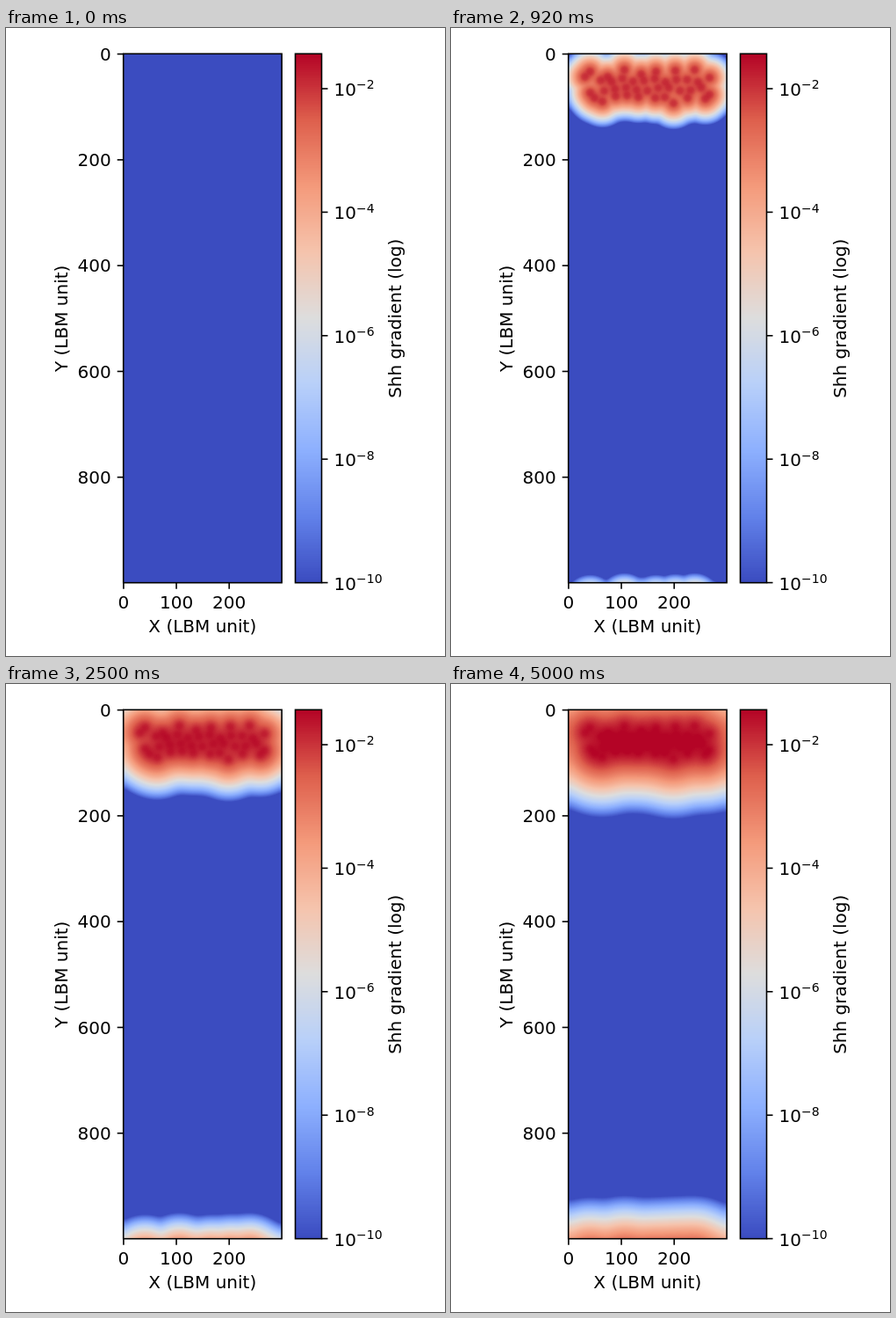
An HTML page with a canvas that plays this animation: 500 px wide and 714 px high, repeating every 5080 ms.

```html
<!DOCTYPE html>
<html lang="en">
<head>
<meta charset="utf-8">
<title>Diffusing gradient</title>
<style>
  html, body { margin: 0; width: 100%; height: 100%; overflow: hidden; background: #fff; }
  canvas { display: block; }
</style>
</head>
<body>
<canvas id="stage" width="500" height="714"></canvas>
<script>
const ctx = document.getElementById('stage').getContext('2d');
const FRAMES = 51, LOOP = 5080;
const PLOT = { x: 134, y: 29, w: 180, h: 602 };
const BAR = { x: 329.5, w: 30 };

// Simulated band of the periodic domain: ABOVE rows lie before y = 0.
const ROWS = 230, ABOVE = 90, W = PLOT.w;
const STEPS = 9, EMISSION = 0.00025, CELL_RADIUS = 4;
const LOG_MIN = -10, LOG_SPAN = 8.57;

const STOPS = [
  [59, 76, 192], [98, 130, 234], [141, 176, 254], [184, 208, 249], [221, 221, 221],
  [245, 196, 173], [244, 154, 123], [222, 96, 77], [180, 4, 38]
];
const palette = Array.from({ length: 256 }, (_, i) => {
  const p = i / 255 * (STOPS.length - 1);
  const n = Math.min(Math.floor(p), STOPS.length - 2);
  return STOPS[n].map((c, j) => Math.round(c + (STOPS[n + 1][j] - c) * (p - n)));
});
const css = i => `rgb(${palette[i].join()})`;

const cells = [
  [24, 20], [63, 18], [99, 20], [121, 19], [143, 18], [18, 26], [44, 26], [82, 23], [160, 27],
  [24, 44], [38, 54], [29, 50], [53, 48], [66, 47], [79, 49], [98, 50], [119, 56], [109, 49],
  [135, 50], [155, 51], [160, 46]
];
for (let i = 0; i < 10; i++) {
  const x = 36 + i * 12.3;
  cells.push([x, 30 + 2 * Math.sin(i * 2.3)], [x + 4, 40 + 2 * Math.cos(i * 1.7)]);
}

function makeSource() {
  const source = new Float64Array(W * ROWS);
  for (const [cx, cy] of cells) {
    for (let y = Math.floor(cy - CELL_RADIUS); y <= cy + CELL_RADIUS; y++) {
      for (let x = Math.floor(cx - CELL_RADIUS); x <= cx + CELL_RADIUS; x++) {
        if (Math.hypot(x - cx, y - cy) <= CELL_RADIUS) source[(y + ABOVE) * W + x] += EMISSION;
      }
    }
  }
  return source;
}

// One lattice step: (1/6, 2/3, 1/6) along both axes, closed side walls.
function diffuse(field, temp, source) {
  for (let y = 0; y < ROWS; y++) {
    const o = y * W;
    for (let x = 0; x < W; x++) {
      const left = field[o + (x ? x - 1 : 0)];
      const right = field[o + (x < W - 1 ? x + 1 : x)];
      temp[o + x] = (left + 4 * field[o + x] + right) / 6;
    }
  }
  for (let i = W; i < W * (ROWS - 1); i++) {
    field[i] = (temp[i - W] + 4 * temp[i] + temp[i + W]) / 6 + source[i];
  }
}

function paintField(field) {
  const image = ctx.createImageData(W, ROWS);
  for (let i = 0; i < field.length; i++) {
    const level = field[i] > 1e-10 ? (Math.log10(field[i]) - LOG_MIN) / LOG_SPAN : 0;
    const color = palette[Math.min(255, Math.floor(level * 256))];
    image.data.set(color, i * 4);
    image.data[i * 4 + 3] = 255;
  }
  return image;
}

function simulate() {
  const source = makeSource();
  const field = new Float64Array(W * ROWS), temp = new Float64Array(W * ROWS);
  const images = [paintField(field)];
  while (images.length < FRAMES) {
    for (let s = 0; s < STEPS; s++) diffuse(field, temp, source);
    images.push(paintField(field));
  }
  return images;
}

function text(str, x, y, align = 'center', size = 20) {
  ctx.font = `${size}px "DejaVu Sans", sans-serif`;
  ctx.textAlign = align;
  ctx.fillText(str, x, y);
}

function verticalText(str, x, y) {
  ctx.save();
  ctx.translate(x, y);
  ctx.rotate(-Math.PI / 2);
  text(str, 0, 0);
  ctx.restore();
}

function line(x1, y1, x2, y2) {
  ctx.beginPath();
  ctx.moveTo(x1, y1);
  ctx.lineTo(x2, y2);
  ctx.stroke();
}

function drawAxes() {
  const top = 29.3, bottom = 630.7, left = 133.7;
  ctx.fillStyle = ctx.strokeStyle = '#000';
  ctx.lineWidth = 1.6;
  ctx.strokeRect(left, top, 180.4, bottom - top);
  for (let n = 0; n < 1000; n += 200) {
    const y = 29.6 + n * 0.6014;
    line(left - 7, y, left, y);
    text(n, 119.6, y + 7.3, 'right');
  }
  for (let n = 0; n < 300; n += 100) {
    const x = 133.9 + n * 0.6014;
    line(x, bottom, x, bottom + 7);
    text(n, x, 659.6);
  }
  text('X (LBM unit)', 223.8, 687);
  verticalText('Y (LBM unit)', 70, 330.3);
}

function drawColorbar() {
  const top = 29.3, bottom = 630.7, height = bottom - top;
  for (let i = 0; i < 256; i++) {
    const y = Math.round(bottom - height * (i + 1) / 256);
    ctx.fillStyle = css(i);
    ctx.fillRect(BAR.x, y, BAR.w, Math.round(bottom - height * i / 256) - y);
  }
  ctx.fillStyle = '#000';
  ctx.strokeRect(BAR.x, top, BAR.w, height);
  for (let i = 0; i < 5; i++) {
    const y = 69 + i * 140.4, right = BAR.x + BAR.w;
    line(right, y, right + 7, y);
    text('10', right + 14, y + 8, 'left');
    text('\u2212' + (2 + 2 * i), right + 39.6, y + 0.4, 'left', 14);
  }
  verticalText('Shh gradient (log)', 450.3, 330.3);
}

function drawField(image) {
  ctx.fillStyle = css(0);
  ctx.fillRect(PLOT.x, PLOT.y, PLOT.w, PLOT.h);
  const y = PLOT.y - ABOVE;
  ctx.putImageData(image, PLOT.x, y, 0, ABOVE, W, ROWS - ABOVE);
  ctx.putImageData(image, PLOT.x, y + PLOT.h, 0, 0, W, ABOVE);
}

// Ten pictures per second, snapped to a 24 Hz clock in whole centiseconds.
const startOf = k => 10 * Math.round(Math.round(2.4 * k) * 100 / 24);

function frameAt(ms) {
  let k = Math.min(FRAMES - 1, Math.floor(ms / 100) + 1);
  while (k > 0 && startOf(k) > ms) k--;
  return k;
}

const images = simulate();
const start = performance.now();
let shown = -1;

function tick() {
  const k = frameAt((performance.now() - start) % LOOP);
  if (k !== shown) {
    shown = k;
    ctx.fillStyle = '#fff';
    ctx.fillRect(0, 0, 500, 714);
    drawField(images[k]);
    drawAxes();
    drawColorbar();
  }
  requestAnimationFrame(tick);
}
tick();
</script>
</body>
</html>
```
